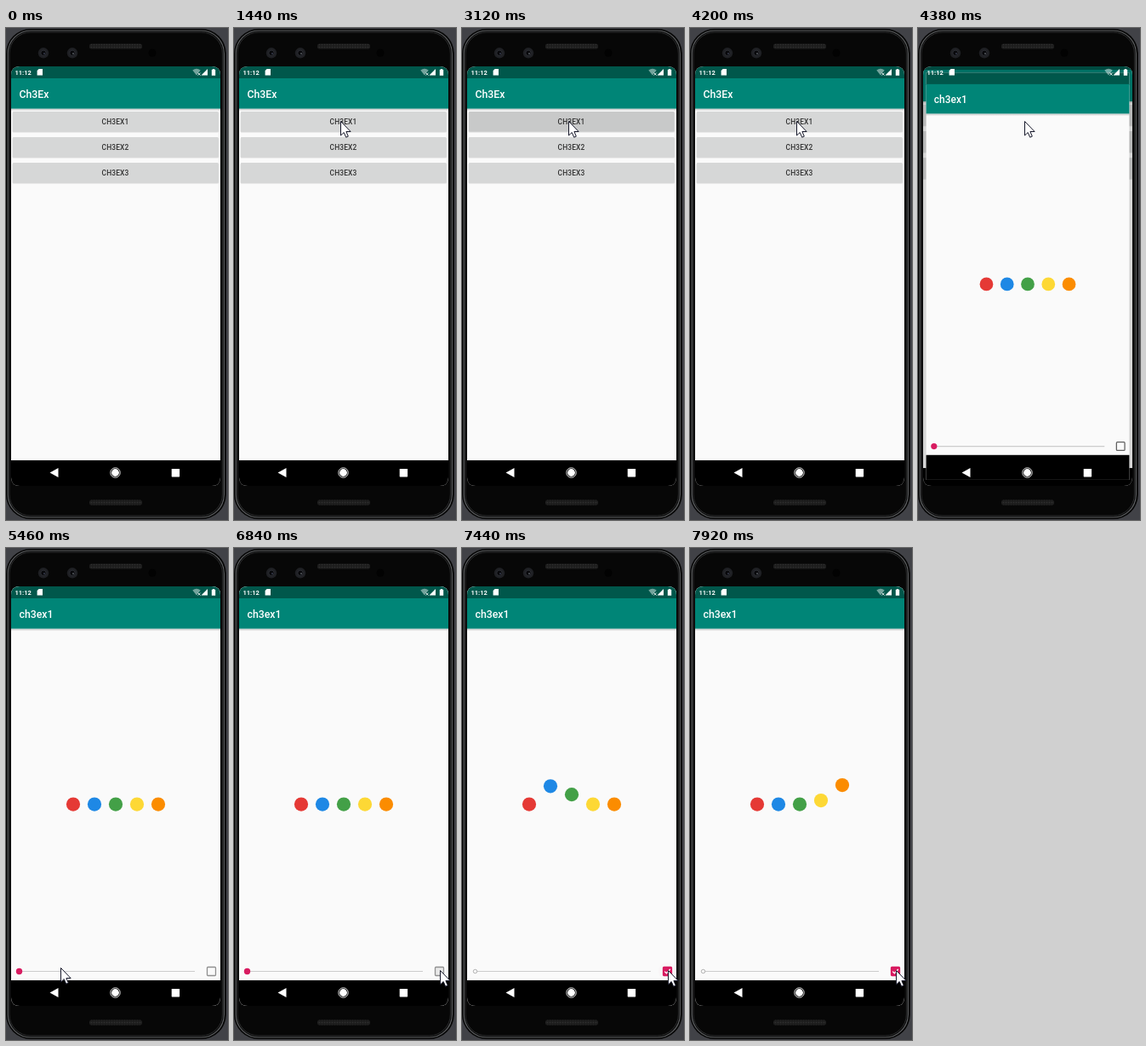
An HTML page that plays this animation: 261 px wide and 577 px high, repeating every 8 s.

```html
<!DOCTYPE html>
<html lang="en">
<head>
<meta charset="utf-8">
<title>Phone demo</title>
<style>
  html, body { margin: 0; width: 100%; height: 100%; overflow: hidden; background: #414247; }
  svg { display: block; width: 100%; height: 100%; }
  text { font-family: Roboto, sans-serif; font-weight: 500; }
  .title { font-size: 12.3px; fill: #fff; }
  .label { font-size: 8.4px; fill: #303030; text-anchor: middle; letter-spacing: .15px; }
</style>
</head>
<body>
<svg viewBox="0 0 261 577">
  <defs>
    <clipPath id="screenClip"><path d="M16 45H242Q252 45 252 55V527Q252 537 242 537H16Q6 537 6 527V55Q6 45 16 45Z"/></clipPath>
    <linearGradient id="shade" x2="0" y2="1">
      <stop offset="0" stop-color="#000" stop-opacity=".22"/>
      <stop offset="1" stop-color="#000" stop-opacity="0"/>
    </linearGradient>
    <pattern id="mesh" width="3" height="3" patternUnits="userSpaceOnUse">
      <rect width="3" height="3" fill="#1d1d1d"/><circle cx="1.5" cy="1.5" r=".8" fill="#303030"/>
    </pattern>
  </defs>

  <!-- phone body -->
  <rect width="261" height="577" fill="#414247"/>
  <rect x="0" y="1" width="258.8" height="575" rx="29" fill="#050505"/>
  <rect x="2.2" y="3" width="254.2" height="571" rx="27" fill="#0a0a0a" stroke="#5c5e60" stroke-width="1.2"/>
  <rect x="4" y="5" width="250.4" height="567" rx="25" fill="#070707" stroke="#2a2b2c" stroke-width="1"/>
  <rect x="98" y="18.5" width="62" height="6" rx="2.5" fill="url(#mesh)"/>
  <rect x="98" y="553.5" width="62" height="6" rx="2.5" fill="url(#mesh)"/>
  <g fill="#1f2024">
    <circle cx="44" cy="29.3" r="6.2"/><circle cx="78" cy="29.3" r="6.2"/>
    <circle cx="172" cy="29.3" r="4.5" fill="#020202"/>
  </g>
  <g fill="#08080b" stroke="#34363d" stroke-width=".8">
    <circle cx="44" cy="29.3" r="3.2"/><circle cx="78" cy="29.3" r="3.2"/>
  </g>
  <circle cx="79" cy="30" r="1" fill="#55585f"/><circle cx="45" cy="30" r=".9" fill="#3c4054"/>

  <g clip-path="url(#screenClip)">
    <rect x="6" y="45" width="246" height="492"/>
    <g id="menu"></g>
    <g id="detail"></g>

    <!-- system icons -->
    <g fill="#fff">
      <text x="10.5" y="55" font-size="7.5" style="font-weight:700">11:12</text>
      <path d="M38.6 48H43V55.5H36.6V50Z"/>
      <path d="M219.3 49.6Q224 46 228.7 49.6L224 55.5Z" opacity=".45"/>
      <path d="M225.6 52.6L228.6 55.6M228.6 52.6L225.6 55.6" stroke="#fff" stroke-width=".8"/>
      <path d="M237 48V55.5H229.5Z"/>
      <path d="M241.8 48.8H243V48H245V48.8H246.2V55.8H241.8Z"/>
      <path d="M51.5 521.5L61.5 516V527Z"/>
      <circle cx="128.5" cy="521.5" r="4.4"/>
      <circle cx="128.5" cy="521.5" r="5.7" fill="none" stroke="#fff" stroke-width=".9"/>
      <rect x="194.7" y="517" width="9.4" height="9.4" rx=".6"/>
    </g>
  </g>

  <path id="cursor" d="M0 0V16.5L3.7 13L6.2 18.7L8.8 17.6L6.4 12H11.6Z"
        fill="#fff" stroke="#16182a" stroke-width="1" stroke-linejoin="round"/>
</svg>

<script>
const LOOP = 8000, STEP = 60;
const $ = id => document.getElementById(id);
const set = (el, attrs) => { for (const k in attrs) el.setAttribute(k, attrs[k]); };
const clamp = v => Math.max(0, Math.min(1, v));

const page = (title, body) => `
  <rect x="6" y="45" width="246" height="492" fill="#fafafa"/>
  ${body}
  <rect x="6" y="94.6" width="246" height="3" fill="url(#shade)"/>
  <rect x="6" y="45" width="246" height="15" fill="#00574b"/>
  <rect x="6" y="59" width="246" height="35.6" fill="#008577"/>
  <text class="title" x="15.5" y="82">${title}</text>
  <rect x="6" y="507" width="246" height="30" fill="#000"/>`;

const button = n => {
  const y = 68 + n * 30;
  return `<rect x="7.5" y="${y + .5}" width="242.5" height="24" rx="1.5" fill="#000" opacity=".13"/>
    <rect id="btn${n}" x="8" y="${y}" width="241.5" height="23.5" rx="1" fill="#d6d7d7"/>
    <text class="label" x="128.5" y="${y + 15}">CH3EX${n}</text>`;
};

const colors = ['#e53935', '#1e88e5', '#43a047', '#fdd835', '#fb8c00'];
$('menu').innerHTML = page('Ch3Ex', [1, 2, 3].map(button).join('')) +
  '<rect id="dim" x="6" y="45" width="246" height="492" opacity="0"/>';
$('detail').innerHTML = page('ch3ex1',
  colors.map((c, i) => `<circle class="dot" cx="${79 + i * 25}" r="8.1" fill="${c}"/>`).join('') +
  `<path d="M15.5 496.5H222" stroke="#cccccc" stroke-width="1.2"/>
   <circle id="thumb" cx="15.5" cy="496.5"/>
   <circle id="ripple" cx="241.4" cy="496.5" r="10.5" fill="#d81b60"/>
   <rect id="box" x="236.5" y="491.5" width="10" height="10" rx="1" stroke-width="1.3"/>
   <path id="tick" d="M238.2 496.6L240.4 498.8L244.8 494" fill="none" stroke="#fff" stroke-width="1.3"/>`);
const dots = document.querySelectorAll('.dot');

// Pointer path: time, x, y
const route = [
  [840, 222, 123], [1020, 185, 108], [1140, 145, 85], [1260, 112, 93], [1380, 121, 108], [1440, 125.5, 109.5],
  [4920, 125.5, 109.5], [4980, 128, 117], [5040, 137, 186], [5100, 147, 222], [5160, 146, 241],
  [5220, 118, 312], [5280, 105, 361], [5340, 98, 415], [5400, 105, 466], [5460, 64.5, 492.5],
  [5520, 41.5, 504], [5760, 220, 491], [5880, 232, 481.5], [6120, 241, 488], [6360, 242.5, 495.5]
];

function pointAt(t) {
  const i = route.findIndex(k => k[0] > t);
  if (i < 0) return route[route.length - 1].slice(1);
  const a = route[i - 1], b = route[i], p = (t - a[0]) / (b[0] - a[0]);
  return [a[1] + (b[1] - a[1]) * p, a[2] + (b[2] - a[2]) * p];
}

const zoom = s => `translate(129 294) scale(${s}) translate(-129 -294)`;

function draw(time) {
  const t = Math.floor(time / STEP) * STEP;

  set($('cursor'), { visibility: t < 840 ? 'hidden' : 'visible' });
  if (t >= 840) set($('cursor'), { transform: `translate(${pointAt(t)})` });

  set($('btn1'), { fill: t >= 3120 && t < 3360 ? '#c8c9c9' : '#d6d7d7' });

  // Screen change: the new page grows in over the old one
  const e = 1 - (1 - clamp((t - 4200) / 420)) ** 2.2;
  set($('menu'), { transform: zoom(1 + .06 * e) });
  set($('dim'), { opacity: .15 * clamp((t - 4200) / 180) });
  set($('detail'), { transform: zoom(.9 + .1 * e), opacity: clamp((t - 4200) / 100) });

  // Checkbox starts the wave and disables the slider
  const on = t >= 7020;
  set($('thumb'), on
    ? { r: 2.2, fill: '#fafafa', stroke: '#b0b0b0', 'stroke-width': 1 }
    : { r: 3.7, fill: '#d81b60', stroke: 'none' });
  set($('box'), on
    ? { fill: '#d81b60', stroke: '#d81b60' }
    : { fill: t >= 6840 ? '#e8e8e8' : '#fafafa', stroke: t < 4620 ? '#606060' : '#909090' });
  set($('tick'), { opacity: on ? 1 : 0 });
  set($('ripple'), { opacity: on ? .14 * clamp((7500 - t) / 400) : 0 });

  const w = t < 7260 ? Math.min(t, 7080) : t;
  dots.forEach((dot, i) => {
    const d = (w - 7224 - i * 174) / 200;
    set(dot, { cy: 300.6 - (Math.abs(d) < 1 ? 22.5 * Math.cos(d * Math.PI / 2) : 0) });
  });
}

const start = performance.now();
function tick() {
  draw((performance.now() - start) % LOOP);
  requestAnimationFrame(tick);
}
tick();
</script>
</body>
</html>
```
